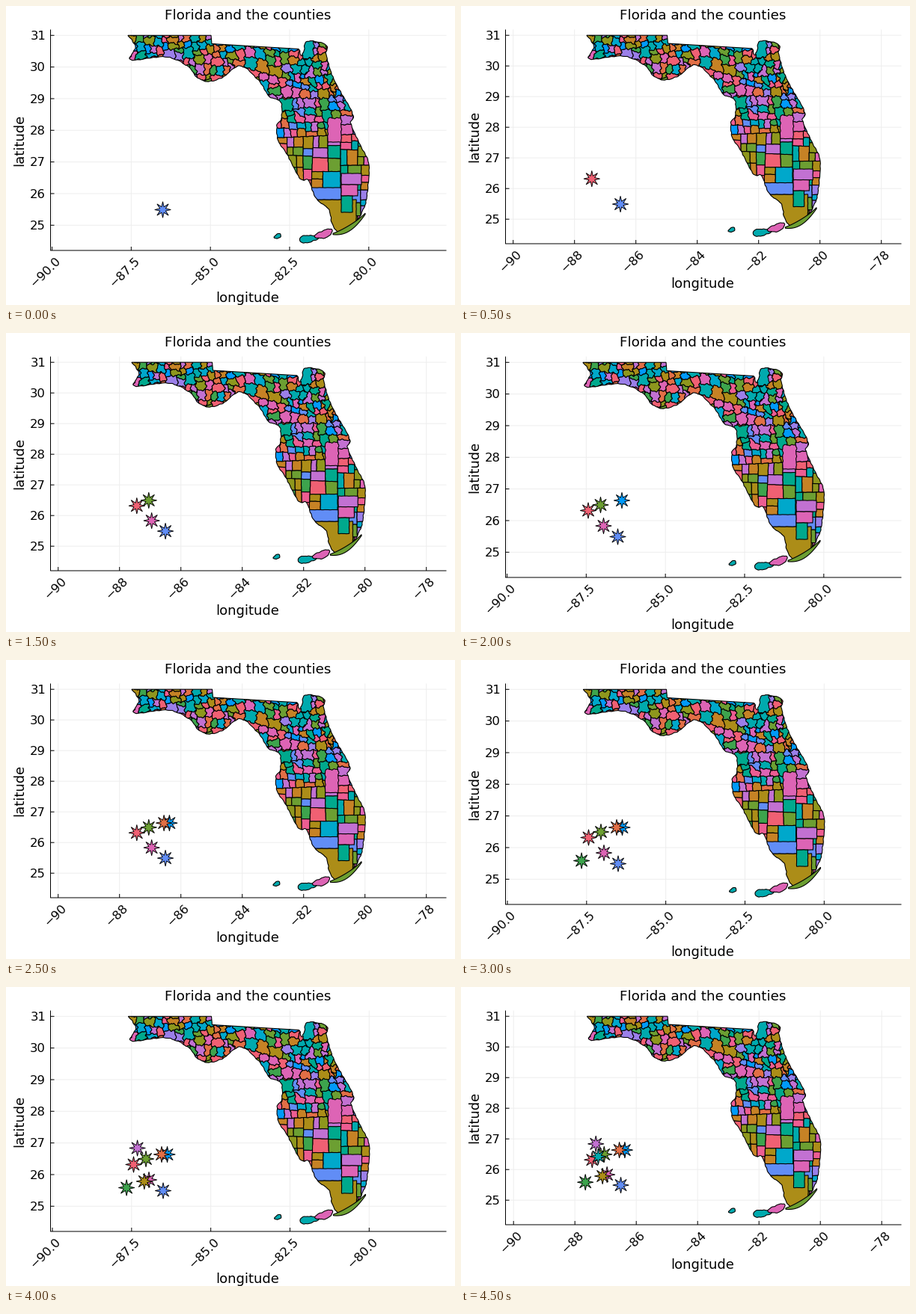
A matplotlib script for the animation above (5 s loop, 600x400 px).

```python
import math
import random

import numpy as np
import matplotlib.pyplot as plt
from matplotlib.animation import FuncAnimation
from matplotlib.collections import PolyCollection
from matplotlib.patches import Polygon
from matplotlib.path import Path
from matplotlib.transforms import Affine2D, Bbox

PX = 0.72  # points per pixel at 100 dpi
PALETTE = ["#009afa", "#e26f46", "#3da44d", "#c271d2", "#ac8d18", "#00aaae",
           "#ed5d92", "#c68225", "#00a98d", "#8e971d", "#00a8cb", "#9b7fe9",
           "#618df6", "#f06073", "#dd64b5", "#6c9f32"]

# Map units: the pixels of the wide layout, 42.33 per degree.
DEG, LON0, LAT0 = 42.33, 61.5, 39.3

NORTH_LINE = [(163, 39.3), (274, 39.3), (275, 50.5), (391, 57.5)]
COAST = [(392, 60), (395, 67), (398, 60), (403, 47), (428, 52), (428, 66),
         (438, 98), (459, 135), (464, 149), (461, 158), (474, 187),
         (485, 213), (482, 256), (479, 268), (468, 288), (446, 302),
         (436, 292), (431, 272), (414, 257), (404, 233), (393, 231),
         (376, 199), (364, 181), (362, 160), (368, 150), (367, 128),
         (352, 121), (337, 99), (313, 80), (290, 95), (270, 101), (255, 95),
         (242, 80), (213, 68), (167, 72), (173, 55), (163, 39.3)]

# Landmark districts: left, top, right, bottom, colour.
LANDMARKS = [(400, 259, 468, 306, 4), (430, 150, 448, 182, 14),
             (405, 243, 448, 259, 12), (448, 224, 475, 239, 3),
             (448, 239, 470, 254, 14), (448, 254, 463, 276, 8),
             (364, 124, 383, 140, 8), (396, 44, 411, 70, 5)]

STARS = [(209.5, 272.5), (170, 237.5), (190.5, 258), (186.5, 230),
         (215, 224), (207.5, 224), (160.6, 268.5), (175.1, 215.5),
         (184.3, 260), (178.4, 233)]


def smooth(points, steps=12):
    """Catmull-Rom curve through the points."""
    p = np.array([points[0], *points, points[-1]], float)
    t = np.arange(steps)[:, None] / steps
    arcs = [b + t * (c - a) / 2 + t**2 * (a - 2.5 * b + 2 * c - d / 2)
            + t**3 * (1.5 * (b - c) + (d - a) / 2)
            for a, b, c, d in zip(p, p[1:], p[2:], p[3:])]
    return np.concatenate(arcs)


def densify(points):
    pts = np.asarray(points, float)
    out = []
    for a, b in zip(pts, np.roll(pts, -1, axis=0)):
        n = max(1, math.ceil(math.hypot(*(b - a))))
        out.append(a + (b - a) * np.arange(n)[:, None] / n)
    return np.concatenate(out)


def wobble(pts, amp):
    x, y = pts.T
    dx = np.sin(.61 * y + .21 * x + 1.7) + .6 * np.sin(1.13 * y - .33 * x)
    dy = np.sin(.57 * x - .19 * y) + .6 * np.sin(1.21 * x + .31 * y + .8)
    return pts + np.column_stack([dx, dy]) * np.reshape(amp, (-1, 1))


def district(points):
    pts = densify(points)
    return wobble(pts, np.interp(pts[:, 1], [130, 185], [.9, .1]))


def box(x0, y0, x1, y1):
    return np.array([(x0, y0), (x1, y0), (x1, y1), (x0, y1)], float)


def cut(poly, point, normal):
    """Split a convex polygon by a line into two polygons."""
    side = (poly - point) @ normal
    low, high = [], []
    for i in range(len(poly)):
        j = (i + 1) % len(poly)
        (high if side[i] > 0 else low).append(poly[i])
        if (side[i] > 0) != (side[j] > 0):
            cross = poly[i] + (poly[j] - poly[i]) * side[i] / (side[i] - side[j])
            low.append(cross)
            high.append(cross)
    return [np.array(p) for p in (low, high) if len(p) > 2]


def bump(x, y, cx, cy):
    return math.exp(-((x - cx)**2 + (y - cy)**2) / 1200)


def grain(x, y):
    """Largest cell width: wide in the Big Bend and the southern inland."""
    return 16.5 + 8 * bump(x, y, 330, 90) + 13 * bump(x, y, 438, 225)


def subdivide(poly):
    low, high = poly.min(axis=0), poly.max(axis=0)
    if not land.intersects_bbox(Bbox([low, high])):
        return []
    size, mid = high - low, (low + high) / 2
    if size.max() <= grain(*mid):
        return [poly]
    axis = int(size[1] > size[0])
    point = mid.copy()
    point[axis] += rng.uniform(-.15, .15) * size[axis]
    lean = rng.gauss(0, .2 if mid[1] < 150 else .02) + axis * math.pi / 2
    parts = cut(poly, point, np.array([math.cos(lean), math.sin(lean)]))
    return [cell for part in parts for cell in subdivide(part)]


def blob(cx, cy, rx, ry, tilt):
    a = np.linspace(0, 2 * math.pi, 60, endpoint=False)
    r = 1 + .12 * np.sin(3 * a + cx)
    pts = np.column_stack([cx + rx * r * np.cos(a), cy + ry * r * np.sin(a)])
    pts[:, 1] -= tilt * (pts[:, 0] - cx)
    return wobble(pts, .3)


def keys():
    """Crescent of islands below the southern tip."""
    t = np.linspace(0, 1, 40)
    x, y = 437 + 43 * t, 305 - 6 * t - 21 * t**2.2
    half = .8 + 3 * np.sin(math.pi * t)
    return np.vstack([np.column_stack([x, y - half]),
                      np.column_stack([x, y + half])[::-1]])


rng = random.Random(12)
coast = wobble(smooth(COAST), .35)
shore = np.vstack([NORTH_LINE, coast])
land = Path(np.vstack([shore, shore[:1]]))

cells = [district(c) for c in subdivide(box(155, 32, 492, 308))]
colors = [rng.choice(PALETTE) for _ in cells]
for *sides, c in LANDMARKS:
    cells.append(district(box(*sides)))
    colors.append(PALETTE[c])

plt.rcParams["font.family"] = "DejaVu Sans"
fig = plt.figure(figsize=(6, 4), dpi=100, facecolor="white")
ax = fig.add_axes([0, 0, 1, 1])
ax.set_xlim(0, 600)
ax.set_ylim(400, 0)
ax.axis("off")

place = Affine2D()
on_map = place + ax.transData
ink = {"lw": 1.1 * PX, "ec": "black", "transform": on_map}
outline = ax.add_patch(Polygon(shore, fill=False, zorder=4, **ink))
mosaic = PolyCollection(cells, facecolors=colors, zorder=3, **ink)
ax.add_collection(mosaic, autolim=False)
mosaic.set_clip_path(outline)
for shape, c in [(blob(363, 308, 4.5, 3, .2), 5),
                 (blob(404, 311.5, 12.5, 4.8, .1), 5),
                 (blob(425, 305, 11.5, 5.2, .3), 14), (keys(), 15)]:
    ax.add_patch(Polygon(shape, fc=PALETTE[c], zorder=5, **ink))


def label(x, y, text, size, ha="center", rotation=0):
    return ax.text(x, y, text, fontsize=size * PX, ha=ha, va="baseline",
                   rotation=rotation, rotation_mode="anchor")


def line(xs, ys, color="black", zorder=2):
    return ax.plot(xs, ys, color=color, lw=PX, zorder=zorder, snap=False,
                   solid_capstyle="butt")[0]


def star(x, y, color):
    turn = np.arange(16) * math.pi / 8
    r = np.where(np.arange(16) % 2, 4.1, 10.8)
    pts = np.column_stack([x + r * np.sin(turn), y - r * np.cos(turn)])
    return ax.add_patch(Polygon(pts, fc=color, ec="black", lw=.9 * PX,
                                zorder=6, joinstyle="miter"))


label(323, 18, "Florida and the counties", 18.4)
drawn = []


def draw_axes(scale, lon0, lat0, bottom, lons, fmt, shift, title_y):
    left, right, top = 59.5, 588.5, 31.5
    for lon in lons:
        x = lon0 + (lon + 90) * scale
        text = format(lon, fmt).replace("-", "\u2212")
        drawn.extend([
            line([x, x], [top, bottom], "#eeeeee", 1),
            line([x, x], [bottom, bottom - 5]),
            label(x - shift + 1.5, bottom + 25 + shift, text, 16.4,
                  rotation=45)])
    for lat in range(25, 32):
        y = lat0 + (31 - lat) * scale
        drawn.extend([
            line([left, right], [y, y], "#eeeeee", 1),
            line([left, left + 5], [y, y]),
            label(53, y + 5.8, str(lat), 16.4, ha="right")])
    drawn.extend([
        line([left, left, right], [top, bottom, bottom]),
        label(323, title_y, "longitude", 18),
        label(23, (top + bottom) / 2, "latitude", 18, rotation=90)])


def update(i):
    while drawn:
        drawn.pop().remove()
    nudge = .5 if i >= 6 else 0  # the seventh star widens the limits
    if i % 2:
        scale, lon0, lat0 = 41.0, 69.7 + nudge, 39.2
        draw_axes(scale, lon0, lat0, 318, range(-90, -77, 2), "d", 1.7, 377)
    else:
        scale, lon0, lat0 = DEG, LON0 + nudge, LAT0
        draw_axes(scale, lon0, lat0, 327, np.arange(-90, -79, 2.5), ".1f", 7,
                  396)
    place.clear().translate(-LON0, -LAT0).scale(scale / DEG)
    place.translate(lon0, lat0)
    for n, spot in enumerate(STARS[:i + 1]):
        drawn.append(star(*place.transform(spot), PALETTE[(12 + n) % 16]))
    return drawn


anim = FuncAnimation(fig, update, frames=10, interval=500, repeat=True,
                     repeat_delay=0, blit=False, init_func=lambda: update(0))
plt.show()
```
